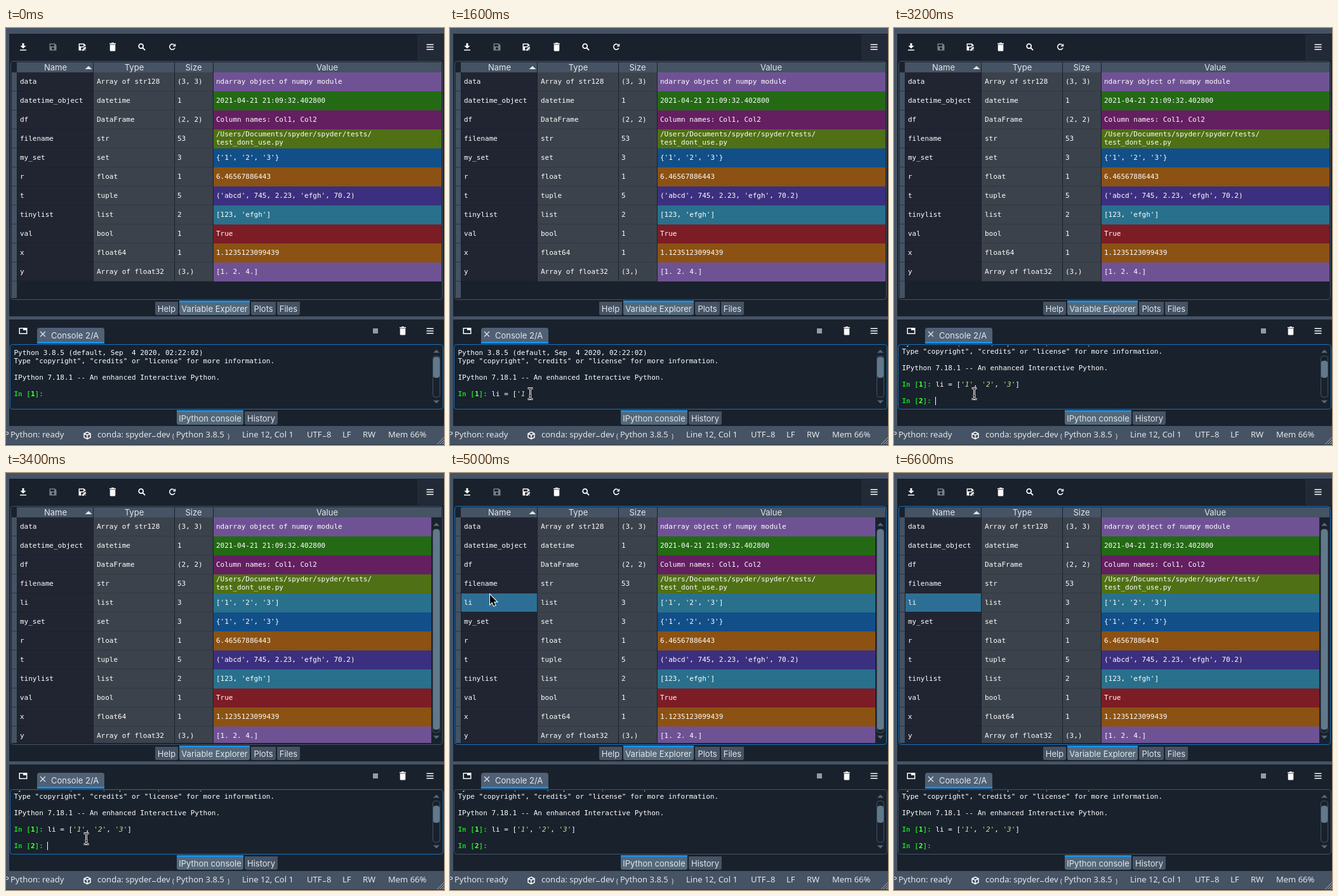
Animation, 690 px wide and 658 px high, one loop 6800 ms. Source, as an HTML page with a canvas:

```html
<!DOCTYPE html>
<html>
<head>
<meta charset="utf-8">
<style>
html, body { margin: 0; width: 100%; height: 100%; overflow: hidden; background: #19212c; }
canvas { display: block; }
</style>
</head>
<body>
<canvas id="stage" width="690" height="658"></canvas>
<script>
const ctx = document.getElementById('stage').getContext('2d');
const LOOP = 6800, STEP = 200;
const DARK = '#19212c', BAR = '#455364', RAISED = '#54687a', BLUE = '#1a8ee0', FOCUS = '#1a72bb', LIGHT = '#e4e6e9';
const MONO = '11px "DejaVu Sans Mono", monospace';
const UI = '13px Inter, sans-serif';
const STATUS = '13px "Noto Sans", sans-serif';
const CHAR = 6.62;

const rows = [
  ['data', 'Array of str128', '(3, 3)', 'ndarray object of numpy module', '#6f5294'],
  ['datetime_object', 'datetime', '1', '2021-04-21 21:09:32.402800', '#246a15'],
  ['df', 'DataFrame', '(2, 2)', 'Column names: Col1, Col2', '#641f61'],
  ['filename', 'str', '53', '/Users/Documents/spyder/spyder/tests/\ntest_dont_use.py', '#4f7014'],
  ['my_set', 'set', '3', "{'1', '2', '3'}", '#124f89'],
  ['r', 'float', '1', '6.46567886443', '#8b5213'],
  ['t', 'tuple', '5', "('abcd', 745, 2.23, 'efgh', 70.2)", '#3b307f'],
  ['tinylist', 'list', '2', "[123, 'efgh']", '#29708d'],
  ['val', 'bool', '1', 'True', '#7c1d26'],
  ['x', 'float64', '1', '1.1235123099439', '#8b5213'],
  ['y', 'Array of float32', '(3,)', '[1. 2. 4.]', '#6f5294'],
];
const newRow = ['li', 'list', '3', "['1', '2', '3']", '#29708d'];
const rowsAfter = [...rows.slice(0, 4), newRow, ...rows.slice(4)];

const command = "li = ['1', '2', '3']";
const typed = [0, 0, 0, 1, 3, 4, 5, 6, 8, 9, 12, 14, 17, 18, 20, 20];
const ENTER = 3200, LISTED = 3400, MOVE = 3800, ARRIVE = 4600, CLICK = 4800, POINTER_OUT = 6200;

const icons = {
  download: 'M-1.5-6h3v4h3L0 2.5-4.5-2h3zM-5 4h10v1.6h-10z',
  floppy: 'M-5.5-5.5h8.5l2.5 2.5v8.5h-11zM-4-4v3h6v-3zM-2 2.2a2 2 0 1 0 4 0a2 2 0 1 0-4 0z',
  trash: 'M-5-6h2.5l1-1h3l1 1h2.5v1.5H-5zM-4.3-3.8h8.6v8.8a1.5 1.5 0 0 1-1.5 1.5h-5.6a1.5 1.5 0 0 1-1.5-1.5z',
  menu: 'M-5.5-4.5h11v1.6h-11zM-5.5-.8h11v1.6h-11zM-5.5 2.9h11v1.6h-11z',
  pane: 'M-6.5-5h13v10h-13zM-5-3.5v7h10v-4.5h-5v-2.5z',
  refresh: 'M5.2-5.5v4.7H.5z',
  pencil: 'M0 4l4.5-4.5 2 2L2 6H0z',
};

function rect(x, y, w, h, color) {
  ctx.fillStyle = color;
  ctx.fillRect(x, y, w, h);
}
function rounded(x, y, w, h, r, fill, stroke) {
  ctx.beginPath();
  ctx.roundRect(x, y, w, h, r);
  if (fill) { ctx.fillStyle = fill; ctx.fill(); }
  if (stroke) { ctx.strokeStyle = stroke; ctx.lineWidth = 1; ctx.stroke(); }
}
function text(s, x, y, font = MONO, color = '#fff', align = 'left') {
  ctx.font = font;
  ctx.fillStyle = color;
  ctx.textAlign = align;
  ctx.fillText(s, x, y);
}
function icon(name, x, y, color = '#fafafa') {
  ctx.save();
  ctx.translate(x, y);
  ctx.fillStyle = color;
  ctx.fill(new Path2D(icons[name]), 'evenodd');
  ctx.restore();
}
function line(d, x, y, width, color = '#fafafa') {
  ctx.save();
  ctx.translate(x, y);
  ctx.lineWidth = width;
  ctx.strokeStyle = color;
  ctx.stroke(new Path2D(d));
  ctx.restore();
}
function triangle(x, y, w, h, color) {
  ctx.fillStyle = color;
  ctx.fill(new Path2D(`M${x - w} ${y + h}h${2 * w}l${-w} ${-2 * h}z`));
}
function clipped(x, y, w, h, draw) {
  ctx.save();
  ctx.beginPath();
  ctx.rect(x, y, w, h);
  ctx.clip();
  draw();
  ctx.restore();
}
function tab(label, x, y, w, active) {
  rounded(x, y, w, 21, [0, 0, 3, 3], active ? RAISED : BAR);
  if (active) rect(x, y - 2, w, 3, BLUE);
  text(label, x + w / 2, y + 16, UI, LIGHT, 'center');
}
function scrollbar(top, bottom, thumbTop, thumbBottom) {
  triangle(678, top - 7, 5, 2.5, RAISED);
  triangle(678, bottom + 8, 5, -2.5, RAISED);
  rounded(672.5, top + .5, 11, bottom - top, 4, DARK, BAR);
  rounded(673, thumbTop, 10, thumbBottom - thumbTop, 4, '#60798b');
}

function toolbar() {
  rect(648, 10, 42, 41, '#232a37');
  icon('download', 27, 30);
  icon('floppy', 74, 30, '#788089');
  icon('floppy', 120, 30);
  line(icons.pencil, 120, 30, 2, DARK);
  icon('pencil', 120, 30);
  icon('trash', 168, 30);
  line('M2.2-1.3a3.5 3.5 0 1 1-7 0a3.5 3.5 0 1 1 7 0M1.2 1.2L5 5', 214, 30, 1.8);
  line('M3.7-2.6A4.3 4.3 0 1 0 4 1.5', 262, 30, 1.6);
  icon('refresh', 262, 30);
  icon('menu', 668, 30);
}

function table(t) {
  const listed = t >= LISTED, selected = t >= CLICK;
  const list = listed ? rowsAfter : rows;
  const right = listed ? 670 : 686;
  rounded(7.5, 52.5, 680, 376, 4, null, selected ? FOCUS : BAR);
  rect(17, 54, 669, 16, BAR);
  rect(9, 70, 8, 356, BAR);
  for (const x of [137, 265, 326]) rect(x, 54, 1, 16, DARK);
  [['Name', 78], ['Type', 202], ['Size', 295.5], ['Value', 506]]
    .forEach(([s, x]) => text(s, x, 67, UI, LIGHT, 'center'));
  triangle(130, 62.5, 5.5, 2.5, LIGHT);

  clipped(9, 70, right - 9, 356, () => list.forEach(([name, type, size, value, color], i) => {
    const y = 70 + 30 * i, picked = selected && name === 'li';
    rect(9, y + 29, 8, 1, '#2b3542');
    rect(18, y, 119, 29, picked ? '#2d6f94' : '#212532');
    rect(138, y, 127, 29, '#3b424b');
    rect(266, y, 60, 29, '#3b424b');
    rect(138, y + 29, 188, 1, '#303842');
    rect(327, y, right - 327, 30, color);
    text(name, 22, y + 18);
    text(type, 143, y + 18);
    text(size, 270, y + 18);
    const lines = value.split('\n');
    lines.forEach((s, n) => text(s, 331, y + (lines.length > 1 ? 101 - 100 + 13 * n : 18) + (lines.length > 1 ? 10 : 0)));
  }));
  if (listed) scrollbar(88, 409, 89, 405);

  tab('Help', 235, 432, 36);
  tab('Variable Explorer', 273, 432, 111, true);
  tab('Plots', 386, 432, 39);
  tab('Files', 427, 432, 36);
}

function prompt(n, y) {
  const green = '#12d51c', bold = 'bold ' + MONO;
  text('In [', 12.5, y, bold, green);
  text(n, 12.5 + 4 * CHAR, y, bold, '#5cff4a');
  text(']:', 12.5 + 5 * CHAR, y, bold, green);
}
function code(s, y) {
  let x = 12.5 + 8 * CHAR;
  for (const part of s.match(/'[^']*'?|[^']+/g) || []) {
    const quoted = part[0] === "'";
    text(part, x, y, (quoted ? 'italic ' : '') + MONO, quoted ? '#b9e58a' : '#fff');
    x += part.length * CHAR;
  }
  return x;
}

function consolePane(t) {
  const entered = t >= ENTER, focused = t < CLICK;
  icon('pane', 27, 478);
  rounded(49, 473, 106, 25, [4, 4, 0, 0], '#506075');
  rect(49, 495, 106, 3, BLUE);
  line('M-4-4l8 8m0-8l-8 8', 58, 483, 1.2, LIGHT);
  text('Console 2/A', 71, 490, UI, LIGHT);
  rect(578, 474, 8, 8, '#969ba1');
  icon('trash', 625, 478);
  icon('menu', 668, 478);
  rounded(6.5, 499.5, 682, 102, 4, null, focused ? FOCUS : BAR);

  clipped(8, 501, 662, 99, () => {
    const top = entered ? 501 : 516;
    text('Python 3.8.5 (default, Sep  4 2020, 02:22:02)', 12.5, top);
    text('Type "copyright", "credits" or "license" for more information.', 12.5, top + 13);
    text('IPython 7.18.1 -- An enhanced Interactive Python.', 12.5, top + 39);
    prompt('1', top + 65);
    let x = code(entered ? command : command.slice(0, typed[t / STEP]), top + 65), y = top + 65;
    if (entered) {
      y += 26;
      prompt('2', y);
      x = 12.5 + 8 * CHAR;
    }
    if (focused && Math.floor(t / 600) % 2) rect(Math.round(x), y - 10, 1, 13, '#fff');
  });
  scrollbar(517, 582, entered ? 525 : 519, 552);

  tab('IPython console', 269, 605, 105, true);
  tab('History', 376, 605, 52);
}

function statusBar() {
  const put = (s, x, y = 646) => text(s, x, y, STATUS, LIGHT);
  rect(0, 628, 690, 30, BAR);
  put('P', -3);
  put('Python: ready', 7);
  line('M0-5.5l5 2.5v6l-5 2.5l-5-2.5v-6zM-5-3l5 2.5l5-2.5M0-.5v6', 128, 643, 1.5);
  put('conda: spyder', 144);
  rect(230, 644, 6, 1, LIGHT);
  put('dev', 237);
  text('(', 262, 648, '10px "Noto Sans", sans-serif', LIGHT);
  put('Python 3.8.5', 268);
  text(')', 349, 648, '10px "Noto Sans", sans-serif', LIGHT);
  put('Line 12, Col 1', 372);
  put('UTF', 474);
  rect(499, 644, 5, 1, LIGHT);
  put('8', 505);
  put('LF', 530);
  put('RW', 562);
  put('Mem 66%', 602);
  line('M-11 0L0-11M-7 0L0-7M-3 0L0-3', 690, 657, 1, '#a4acb5');
  rect(0, 657, 690, 1, '#2a3441');
}

function pointer(t) {
  if (t < 400 || t >= POINTER_OUT) return;
  const p = Math.min(1, Math.max(0, (t - MOVE) / (ARRIVE - MOVE)));
  const ease = p * p * (3 - 2 * p);
  const x = 126.5 - 63.5 * ease, y = 577 - 385 * ease;
  if (y > 500 && y < 602) {
    const beam = 'M-4-8.5h2.5l1.5 1.5l1.5-1.5h2.5M-4 8.5h2.5l1.5-1.5l1.5 1.5h2.5M0-7v14M-2 3h4';
    line(beam, x, y, 3, '#fff');
    line(beam, x, y, 1.1, '#111');
  } else {
    const arrow = 'M0 0v15l3.4-3.2l2.6 6l2.6-1.1l-2.6-5.8h4.7z';
    line(arrow, x, y, 2, '#fff');
    ctx.save();
    ctx.translate(x, y);
    ctx.fillStyle = '#000';
    ctx.fill(new Path2D(arrow));
    ctx.restore();
  }
}

function draw(now) {
  const t = Math.floor(now % LOOP / STEP) * STEP;
  rect(0, 0, 690, 658, BAR);
  rect(5, 9, 685, 446, DARK);
  rect(5, 460, 685, 168, DARK);
  toolbar();
  table(t);
  consolePane(t);
  statusBar();
  pointer(t);
}

const start = performance.now();
function tick() {
  draw(performance.now() - start);
  requestAnimationFrame(tick);
}
tick();
</script>
</body>
</html>
```
